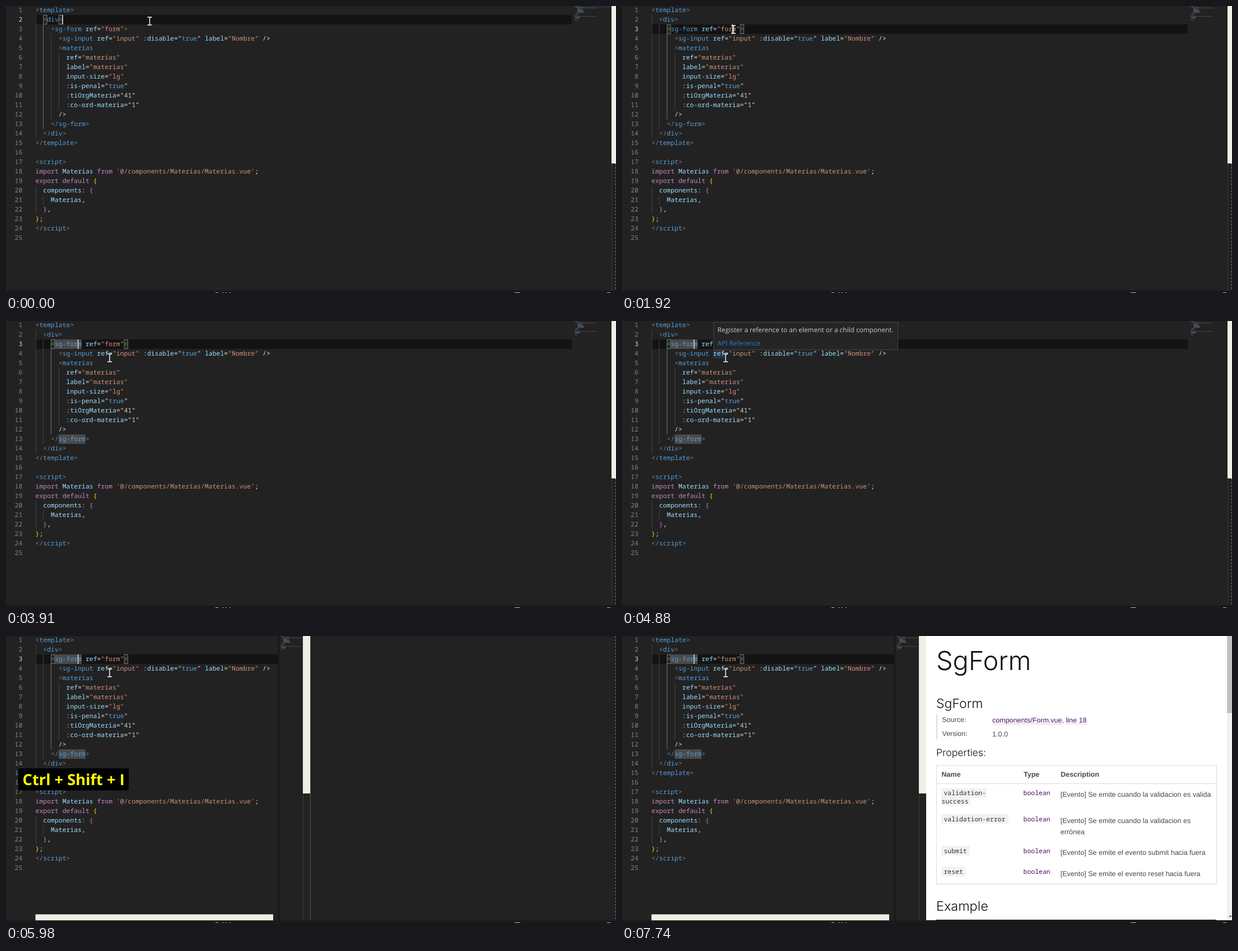
Animation, 1089 px wide and 514 px high, one loop 8000 ms. Source, as an HTML page:

```html
<!DOCTYPE html>
<html lang="es">
<head>
<meta charset="utf-8">
<title>Editor con documentación</title>
<style>
  html, body { margin: 0; width: 100%; height: 100%; overflow: hidden; background: #222; }
  svg { display: block; width: 100%; height: 100%; }
  text { text-rendering: geometricPrecision; white-space: pre; }
  .mono { font: 11.45px "Noto Sans Mono", "DejaVu Sans Mono", monospace; }
  .code { font-weight: 500; }
  .ui { font: 11.87px "Open Sans", "Noto Sans", sans-serif; }
  .body { font: 12.53px "Liberation Sans", Arial, sans-serif; fill: #484848; }
  .head { font-family: Inter, sans-serif; font-weight: 300; fill: #111; }
  .bold { font-weight: 700; }
  .keys { font: 700 27.3px "Open Sans", "Noto Sans", sans-serif; fill: #ff0; }
</style>
</head>
<body>
<svg id="stage" viewBox="0 0 1089 514" preserveAspectRatio="none"></svg>
<script>
const LOOP = 8000, LEFT = 52.6, CHAR = 6.872, PITCH = 17, BASELINE = 11.8;
const CLICK_1 = 1720, CLICK_2 = 2890, SPLIT = 5830, PAGE = 6040;

const COLORS = {
  g: '#808080', b: '#569cd6', a: '#9cdcfe', s: '#ce9178', w: '#e2e2e2',
  n: '#c4d8b8', p: '#c586c0', y: '#ffd700', o: '#da70d6'
};

// Tokens are split by "~"; the first letter of each is its colour key.
const CODE = [
  'g<~btemplate~g>',
  'g  <~bdiv~g>',
  'g    <~bsg-form~a ref~w=~s"form"~g>',
  'g      <~bsg-input~a ref~w=~s"input"~a :disable~w="~btrue~w"~a label~w=~s"Nombre"~w />',
  'g      <~bmaterias',
  'a        ref~w=~s"materias"',
  'a        label~w=~s"materias"',
  'a        input-size~w=~s"lg"',
  'a        :is-penal~w="~btrue~w"',
  'a        :tiOrgMateria~w="~n41~w"',
  'a        :co-ord-materia~w="~n1~w"',
  'w      />',
  'g    </~bsg-form~g>',
  'g  </~bdiv~g>',
  'g</~btemplate~g>',
  '',
  'g<~bscript~g>',
  "pimport~a Materias~p from~s '@/components/Materias/Materias.vue'~w;",
  'pexport~p default~y {',
  'a  components:~o {',
  'a    Materias~w,',
  'o  }~w,',
  'y}~w;',
  'g</~bscript~g>',
  ''
];

const colX = col => LEFT + col * CHAR;
const lineY = line => (line - 1) * PITCH - 1;
const esc = s => s.replace(/&/g, '&amp;').replace(/</g, '&lt;');
const rect = (x, y, w, h, fill, extra = '') =>
  `<rect x="${x}" y="${y}" width="${w}" height="${h}" fill="${fill}" ${extra}/>`;
const text = (x, y, str, cls, extra = '') =>
  `<text x="${x}" y="${y}" class="${cls}" ${extra}>${esc(str)}</text>`;
const group = (id, content) => `<g id="${id}">${content}</g>`;

function eachToken(visit) {
  CODE.forEach((line, i) => {
    let col = 0;
    for (const token of line ? line.split('~') : []) {
      const body = token.slice(1), word = body.trimStart();
      visit(i + 1, col + body.length - word.length, word, COLORS[token[0]]);
      col += body.length;
    }
  });
}

function codeText() {
  let out = '';
  eachToken((line, col, word, color) => {
    out += text(colX(col), lineY(line) + BASELINE, word, 'mono code', `fill="${color}"`);
  });
  return out;
}

function minimap() {
  let out = '';
  eachToken((line, col, word, color) => {
    out += rect(1015 + col * 0.66, (line - 1) * 1.08, word.length * 0.66, 0.8, color, 'opacity=".38"');
  });
  return out;
}

const lineNumbers = () => CODE.map((_, i) =>
  text(29.3, lineY(i + 1) + BASELINE, String(i + 1), 'mono code', `id="num${i + 1}" text-anchor="end" fill="#858585"`)).join('');

const guide = (col, first, last, color = '#404040') =>
  rect(Math.round(colX(col)), lineY(first), 1, (last - first + 1) * PITCH, color);

const bracketBox = (col, line) =>
  rect(colX(col) + 0.4, lineY(line) + 0.5, CHAR - 0.5, PITCH - 1, '#1a2a1a', 'stroke="#777" stroke-width="1"');

const wordMark = (col, line, chars) => rect(colX(col), lineY(line), chars * CHAR, PITCH, '#4a4a4a');

const chip = (x, y, w, h) => rect(x, y, w, h, '#f2f2f2', 'rx="2"');

function docsPage() {
  const purple = 'fill="#4a0f62"';
  const code = (x, y, str) => text(x, y, str, 'mono', 'fill="#333"');
  const type = y => text(716.6, y, 'boolean', 'mono', purple);
  const note = (y, str) => text(782.8, y, str, 'body');
  const title = (y, size, str) => text(561, y, str, 'head', `font-size="${size}"`);
  return rect(543, 0, 546, 509, '#fff') +
    title(60.5, 46.8, 'SgForm') + title(129, 23, 'SgForm') +
    title(215, 17.7, 'Properties:') + title(491.5, 23.4, 'Example') +
    rect(561.5, 140, 1.4, 45, '#ccc') +
    text(571.5, 154, 'Source:', 'body') + text(571.5, 179, 'Version:', 'body') +
    `<text x="661" y="155" class="body"><tspan ${purple}>components/Form.vue</tspan>, <tspan ${purple}>line 18</tspan></text>` +
    rect(661, 157, 125, 1, '#d5c8da') + rect(793, 157, 37, 1, '#d5c8da') +
    text(661, 180, '1.0.0', 'body') +
    rect(561.5, 443.5, 500, 2, '#eee') +
    rect(561.5, 231.5, 500, 212.5, '#fff', 'stroke="#ddd"') +
    rect(562, 264, 499, 1, '#ddd') +
    text(570.5, 252, 'Name', 'body bold') + text(717, 252, 'Type', 'body bold') +
    text(783, 252, 'Description', 'body bold') +
    chip(570, 272.5, 81, 17) + chip(570, 288.5, 52, 15) + chip(570, 319, 120, 17) +
    chip(570, 376, 50.5, 17) + chip(570, 413.5, 44, 17) +
    code(574.5, 285, 'validation-') + code(570.5, 299.5, 'success') +
    code(574.5, 331.5, 'validation-error') + code(574.5, 388.5, 'submit') + code(574.5, 426, 'reset') +
    [285, 331.5, 388.5, 426].map(type).join('') +
    note(288, '[Evento] Se emite cuando la validacion es valida') +
    note(334.5, '[Evento] Se emite cuando la validacion es') + note(354.5, 'errónea') +
    note(392, '[Evento] Se emite el evento submit hacia fuera') +
    note(429.5, '[Evento] Se emite el evento reset hacia fuera') +
    rect(561, 508, 500, 1.5, '#222') +
    rect(1080, 0, 9, 509, '#f1f1f1') + rect(1080, 0, 9, 138, '#c1c1c1') +
    '<path d="M1083 501h6l-3 3z" fill="#505050"/>';
}

const stage = document.getElementById('stage');
stage.innerHTML =
  '<defs><linearGradient id="shade"><stop stop-color="#151515"/><stop offset="1" stop-color="#222"/></linearGradient></defs>' +
  rect(0, 0, 1089, 514, '#222') +
  group('active', rect(LEFT, 0, 957.4, PITCH, '#131313')) +
  guide(0, 2, 14) + guide(2, 3, 13) + guide(4, 4, 12) + guide(6, 6, 11) +
  guide(0, 20, 22) + guide(2, 21, 21) +
  group('onDiv', guide(2, 3, 13, '#707070') + bracketBox(2, 2) + bracketBox(6, 2) +
    rect(1014, 1, 68, 1.2, '#264f78', 'opacity=".6"')) +
  group('onForm', guide(4, 4, 12, '#707070') + bracketBox(4, 3) + bracketBox(23, 3)) +
  group('words', wordMark(5, 3, 7) + wordMark(6, 13, 7)) +
  group('refMark', rect(colX(16), lineY(4), 3 * CHAR, PITCH, '#264f78', 'opacity=".45"')) +
  lineNumbers() + codeText() +
  group('caret', rect(0, 0, 1.5, PITCH, '#d8d8d8')) +
  group('wide', rect(1081, 0, 8, 282, '#efefe6') + rect(1081, 282, 1, 228, '#333')) +
  group('split', rect(485, 0, 604, 510, '#222') + rect(485, 0, 5, 510, 'url(#shade)') +
    rect(530, 0, 1, 510, '#3a3a3a') + rect(543, 0, 1, 510, '#555') +
    rect(530, 0, 13, 282, '#efefe6') + rect(LEFT, 498.5, 424.4, 11, '#efefe6')) +
  group('map', minimap()) +
  '<path id="edge" stroke="#808080" stroke-dasharray="3 3" d=""/>' +
  group('page', docsPage()) +
  rect(0, 509.5, 1089, 4.5, '#191919') +
  [[374, 5], [386, 2], [392, 2], [399, 2], [908, 10], [1073, 6]].map(([x, w]) => rect(x, 513, w, 1, '#bbb')).join('') +
  group('tip', rect(163.5, 2.5, 329, 49, '#252526', 'stroke="#454545"') +
    text(170.5, 20, 'Register a reference to an element or a child component.', 'ui', 'fill="#ccc"') +
    text(170.5, 44.3, 'API Reference', 'ui', 'fill="#1f80cc"')) +
  group('keys', rect(22, 237, 197, 39.5, '#000') + text(29.5, 266.5, 'Ctrl + Shift + I', 'keys')) +
  group('mouse', '<path d="M-4-7h3l1 1 1-1h3M0-6V6M-4 7h3l1-1 1 1h3" fill="none" stroke="#fff" stroke-width="1.4"/>');

const el = Object.fromEntries([...stage.querySelectorAll('[id]')].map(node => [node.id, node]));
const show = (id, on) => el[id].setAttribute('display', on ? 'inline' : 'none');
const move = (id, x, y) => el[id].setAttribute('transform', `translate(${x} ${y})`);

// Pointer stops: time, x, y.
const POINTER = [
  [0, 256.5, 27], [50, 256.5, 27], [350, 249, 27], [500, 249, 27], [750, 243, 28.5], [900, 243, 28.5],
  [1120, 227, 36], [1320, 214, 41], [1570, 214, 41], [1720, 199, 42], [2090, 199, 42],
  [2700, 128, 42.5], [3400, 128, 42.5], [3550, 185, 66], [LOOP, 185, 66]
];
// The caret starts visible and flips at each of these times.
const BLINKS = [120, 620, 1120, CLICK_1, 2220, 2720, 3400, 3910, 4410, 4880, 5370, 5860, 6280, 6740, 7250, 7740];

function pointerAt(t) {
  const i = POINTER.findIndex(stop => stop[0] > t);
  const [t0, x0, y0] = POINTER[i - 1], [t1, x1, y1] = POINTER[i];
  const k = (t - t0) / (t1 - t0);
  return [x0 + (x1 - x0) * k, y0 + (y1 - y0) * k];
}

function draw(t) {
  const onDiv = t < CLICK_1, split = t >= SPLIT;
  const line = onDiv ? 2 : 3;
  show('onDiv', onDiv);
  show('onForm', !onDiv);
  show('words', t >= 3150);
  move('active', 0, lineY(line));
  el.num2.setAttribute('fill', onDiv ? '#d0d0d0' : '#858585');
  el.num3.setAttribute('fill', onDiv ? '#858585' : '#d0d0d0');

  show('caret', BLINKS.filter(b => b <= t).length % 2 === 0);
  move('caret', colX(onDiv ? 7 : t < CLICK_2 ? 21 : 11) - 0.3, lineY(line));

  const tip = t < 5730 ? Math.min(1, Math.max(0, (t - 3980) / 180)) : 0;
  el.tip.setAttribute('opacity', tip);
  el.refMark.setAttribute('opacity', tip);

  show('wide', !split);
  show('split', split);
  move('map', split ? -525 : 0, 0);
  el.edge.setAttribute('d', `M1088.5 ${split ? 0 : 282}V510`);
  show('page', t >= PAGE);
  show('keys', t >= 5220 && t < 6590);
  move('mouse', ...pointerAt(t));
}

const start = performance.now();
function tick() {
  draw((performance.now() - start) % LOOP);
  requestAnimationFrame(tick);
}
tick();
</script>
</body>
</html>
```
